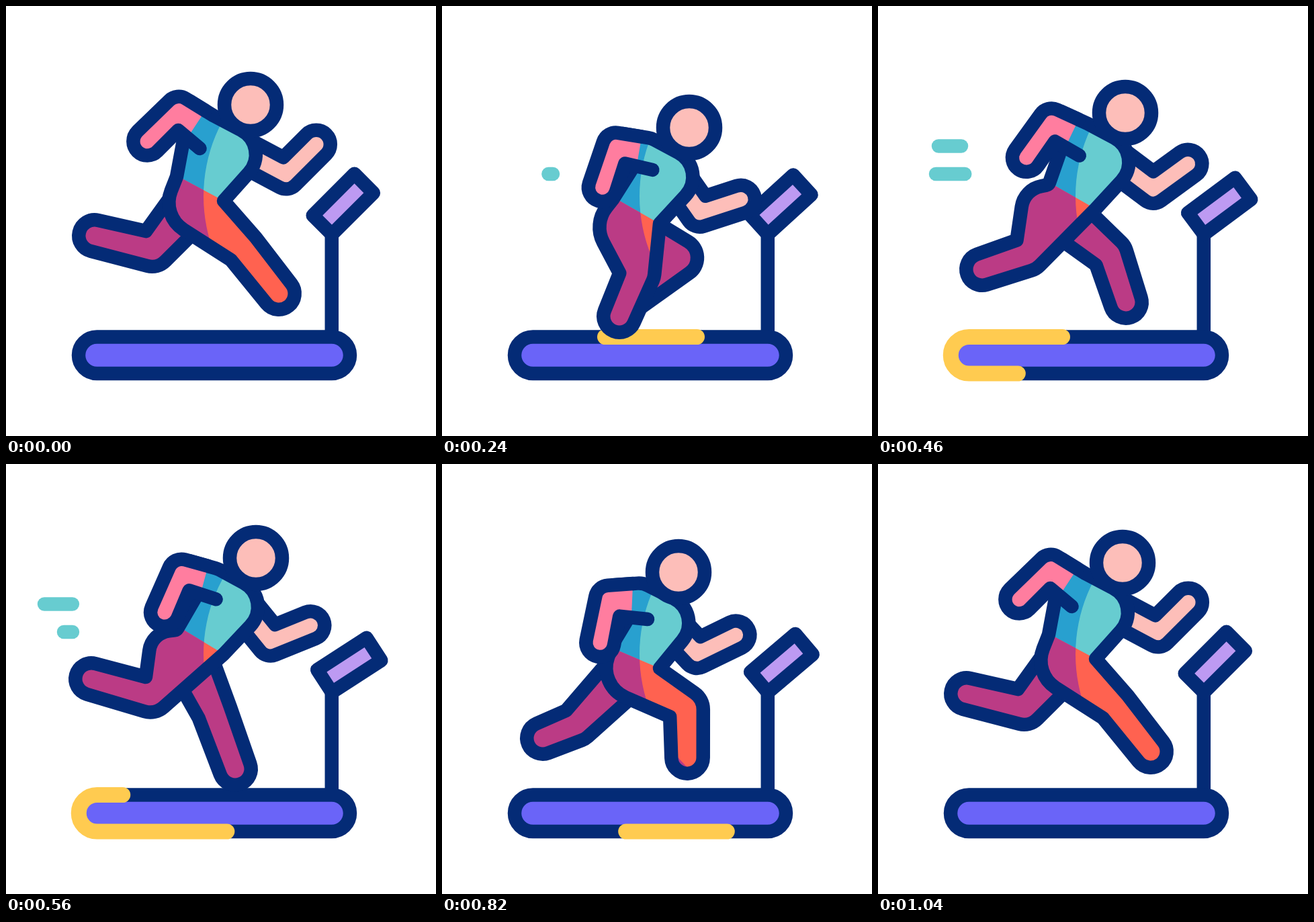
Write an HTML page with a canvas that moves like this. It is 640x640 px and loops after 1060 ms.

```html
<!DOCTYPE html>
<html lang="en">
<head>
<meta charset="utf-8">
<title>Treadmill runner</title>
<style>
  html, body { margin: 0; width: 100%; height: 100%; overflow: hidden; background: #fff; }
  canvas { display: block; width: 640px; height: 640px; }
</style>
</head>
<body>
<canvas id="stage" width="640" height="640"></canvas>
<script>
const ctx = document.getElementById('stage').getContext('2d');
const LOOP = 1060, STRIDE = 1040, FRAME = 20, LINE = 20.5;
const NAVY = '#042b76', TEAL = '#67ccd0', BLUE = '#28a0cf', ORANGE = '#ff6250',
  PLUM = '#bb3b85', SKIN = '#fdbeb9', PINK = '#ff7d9f', VIOLET = '#6a64f8',
  LILAC = '#bd9af2', YELLOW = '#ffcb50';

// Key poses: time | head | arm angles near, far | near knee, foot | far knee, foot
const POSES = [
  [0,   364, 147,   40, 45,   353, 361, 406, 428,   217, 363, 132, 342],
  [240, 368, 181,   13, 18,   290, 401, 264, 462,   356, 376, 282, 430],
  [460, 368, 159,   30, 36,   221, 370, 155, 392,   346, 371, 369, 441],
  [560, 372, 140,   18, 22,   215, 345, 127, 320,   310, 369, 341, 454],
  [720, 363, 153,   -3,  9,   308, 373, 226, 394,   270, 398, 238, 445],
  [820, 352, 161,    6, 26,   364, 363, 365, 437,   199, 388, 150, 408]
];

// Smooth periodic interpolation through the key poses.
function poseAt(t) {
  const n = POSES.length;
  const row = i => POSES[(i + n) % n];
  const time = i => row(i)[0] + Math.floor(i / n) * STRIDE;
  let i = n - 1;
  while (time(i) > t) i--;
  const h = time(i + 1) - time(i), u = (t - time(i)) / h;
  const slope = (j, k) => {
    const a = time(j) - time(j - 1), b = time(j + 1) - time(j);
    return ((row(j)[k] - row(j - 1)[k]) / a * b + (row(j + 1)[k] - row(j)[k]) / b * a) / (a + b);
  };
  const value = k => {
    const v = row(i)[k], w = row(i + 1)[k], m = slope(i, k) * h, q = slope(i + 1, k) * h;
    return v + u * (m + u * (3 * (w - v) - 2 * m - q + u * (2 * (v - w) + m + q)));
  };
  const point = k => ({ x: value(k), y: value(k + 1) });
  return {
    head: point(1), nearAngle: value(3), farAngle: value(4),
    knee: point(5), foot: point(7), farKnee: point(9), farFoot: point(11)
  };
}

// Piecewise linear motion through [time, value] pairs.
function ramp(t, ...keys) {
  if (t <= keys[0][0]) return keys[0][1];
  for (let i = 1; i < keys.length; i++) {
    const [a, v] = keys[i - 1], [b, w] = keys[i];
    if (t <= b) return v + (w - v) * (t - a) / (b - a);
  }
  return keys[keys.length - 1][1];
}

const shift = (p, x, y) => ({ x: p.x + x, y: p.y + y });
const polar = (p, deg, r) =>
  shift(p, r * Math.cos(deg * Math.PI / 180), r * Math.sin(deg * Math.PI / 180));
const mix = (a, b, f) => ({ x: a.x + (b.x - a.x) * f, y: a.y + (b.y - a.y) * f });
const dist = (a, b) => Math.hypot(a.x - b.x, a.y - b.y);
const unit = (a, b) => ({ x: (b.x - a.x) / dist(a, b), y: (b.y - a.y) / dist(a, b) });
const corner = (p, r) => ({ ...p, r });
const cap = (p, r) => ({ ...p, cap: r });

// Mitred outline points on both sides of joint b for a limb of half width w.
function bend(a, b, c, w) {
  const d = unit(a, b), e = unit(b, c);
  const x = d.x + e.x, y = d.y + e.y, k = 2 * w / (x * x + y * y);
  return [shift(b, y * k, -x * k), shift(b, -y * k, x * k)];
}

// Replaces a cap by its two tangent points, joined by an arc.
function withCaps(list) {
  return list.flatMap((p, i) => {
    if (!p.cap) return [p];
    const prev = list[i - 1], next = list[i + 1];
    const cross = (prev.x - p.x) * (next.y - p.y) - (prev.y - p.y) * (next.x - p.x);
    const side = cross > 0 ? 1 : -1;
    const touch = (q, s) => {
      const a = Math.atan2(q.y - p.y, q.x - p.x) + s * Math.acos(Math.min(1, p.cap / dist(p, q)));
      return { x: p.x + p.cap * Math.cos(a), y: p.y + p.cap * Math.sin(a), a };
    };
    const from = touch(prev, -side), to = touch(next, side);
    return [from, { ...to, arc: [p.x, p.y, p.cap, from.a, to.a, side > 0] }];
  });
}

function trace(list) {
  const path = new Path2D(), pts = withCaps(list);
  path.moveTo(pts[0].x, pts[0].y);
  for (let i = 1; i < pts.length; i++) {
    const p = pts[i], a = pts[i - 1], b = pts[i + 1];
    if (p.arc) path.arc(...p.arc);
    else if (p.r && b) {
      const turn = Math.atan2(a.y - p.y, a.x - p.x) - Math.atan2(b.y - p.y, b.x - p.x);
      const half = Math.acos(Math.max(-1, Math.min(1, Math.cos(turn)))) / 2;
      const room = .7 * Math.min(dist(a, p), dist(b, p)) * Math.tan(half);
      path.arcTo(p.x, p.y, b.x, b.y, Math.min(p.r, room));
    } else path.lineTo(p.x, p.y);
  }
  return path;
}

function fill(path, color, rule) {
  ctx.fillStyle = color;
  ctx.fill(path, rule || 'nonzero');
}
function stroke(path, color = NAVY, width = LINE) {
  ctx.strokeStyle = color;
  ctx.lineWidth = width;
  ctx.stroke(path);
}
function outlined(path, color) {
  fill(path, color);
  stroke(path);
}

function drawMachine(t) {
  stroke(new Path2D('M484.8 340V492'));
  const nod = t < 560 ? (t / 560) ** 1.8 : ((STRIDE - t) / 480) ** 1.2;
  ctx.save();
  ctx.translate(485, 340);
  ctx.rotate((12 * nod - 45) * Math.PI / 180);
  const screen = new Path2D();
  screen.rect(0, -40, 87.5, 40);
  outlined(screen, LILAC);
  ctx.restore();

  const belt = new Path2D();
  belt.roundRect(108, 492.5, 404, 54.5, 27.25);
  outlined(belt, VIOLET);

  const head = ramp(t, [20, 0], [240, 242], [590, 664], [920, 749]);
  const tail = ramp(t, [20, 0], [460, 210], [995, 749]);
  if (head - tail < 1) return;
  const loop = new Path2D();
  loop.moveTo(484.5, 492.5);
  loop.lineTo(135.5, 492.5);
  loop.arc(135.5, 519.75, 27.25, -Math.PI / 2, Math.PI / 2, true);
  loop.lineTo(484.5, 547);
  ctx.setLineDash([head - tail, 2000]);
  ctx.lineDashOffset = -tail;
  stroke(loop, YELLOW, 23);
  ctx.setLineDash([]);
}

// A streak whose ends both fly left at the same speed, the tail after the head.
function drawWind(t, y, from, to, start, delay) {
  const end = x => Math.max(to, Math.min(from, x));
  const head = end(from - .33 * (t - start));
  const tail = end(from - .303 * (t - start - delay));
  if (tail - head > .5) stroke(new Path2D(`M${head} ${y}H${tail}`), TEAL);
}

function drawFarArm({ head, farAngle }) {
  const elbow = polar(shift(head, -12.5, 39), 90 - farAngle, 92);
  const hand = polar(elbow, -farAngle, 64);
  const back = -farAngle - 107;
  const [fold, outer] = bend(polar(elbow, back, 60), elbow, hand, 21);
  outlined(trace([
    polar(fold, back, 48), fold, cap(hand, 21), corner(outer, 20), polar(outer, back, 60)
  ]), SKIN);
}

function drawFarLeg({ farKnee, farFoot }, waist) {
  const hip = shift(waist, -50, 8), d = unit(hip, farKnee), w = 32;
  const [front, back] = bend(hip, farKnee, farFoot, 25);
  outlined(trace([
    shift(hip, -d.y * w, d.x * w), back, cap(farFoot, 23.7),
    corner(front, 28), shift(hip, d.y * w, -d.x * w)
  ]), PLUM);
}

function drawBody({ head, nearAngle, knee, foot }, waist, lean) {
  const shoulder = { x: 312 - .4 * nearAngle + .8 * lean, y: head.y + 41 - .5 * lean };
  const elbow = polar(shoulder, nearAngle, -50);
  const wrist = polar(elbow, nearAngle + 95.5, 63);
  const [inner, outer] = bend(shoulder, elbow, wrist, 20.5);
  const fold = polar(inner, nearAngle, 42);

  const hip = shift(waist, -45, 0), swing = unit(hip, knee).x;
  const [kneeFront, kneeBack] = bend(hip, knee, foot, 25);
  const neck = shift(waist, .8 * lean - 13, -127);
  const body = trace([
    shift(mix(inner, fold, .25), 0, 6),
    corner(shift(waist, -70, -36), 6),
    corner(shift(waist, 10 * swing - 100, 37 * swing - 5), 48),
    kneeBack, cap(foot, 23.7), corner(kneeFront, 30), waist,
    corner(shift(waist, 74 + .5 * lean, -81), 41),
    corner(neck, 30), mix(outer, neck, .35)
  ]);

  // Everything left of a large circle lies in shade; the waist line splits shirt and trousers.
  const shade = new Path2D();
  shade.rect(0, 0, 640, 640);
  shade.arc(529, 283, 235, 0, 2 * Math.PI);
  const slope = .56 + .009 * lean;
  const level = x => waist.y + slope * (x - waist.x);
  const below = new Path2D(`M0 ${level(0)}L640 ${level(640)}V800H0Z`);
  ctx.save();
  ctx.clip(body);
  fill(body, TEAL);
  fill(shade, BLUE, 'evenodd');
  ctx.clip(below);
  fill(body, ORANGE);
  fill(shade, PLUM, 'evenodd');
  ctx.restore();
  stroke(body);

  const arm = [inner, cap(wrist, 21), corner(outer, 20), mix(outer, neck, .78)];
  fill(trace([mix(inner, fold, .42), ...arm]), PINK);
  stroke(trace([fold, ...arm]));
}

function draw(t) {
  const pose = poseAt(t % STRIDE), { head } = pose;
  const waist = { x: 324, y: head.y + 143 }, lean = head.x - 367;
  ctx.fillStyle = '#fff';
  ctx.fillRect(0, 0, 640, 640);
  ctx.lineJoin = ctx.lineCap = 'round';

  drawWind(t, 208.5, 124, 44, 357, 120);
  drawWind(t, 250, 165, 86, 220, 122);
  drawMachine(t);
  drawFarArm(pose);
  drawFarLeg(pose, waist);
  drawBody(pose, waist, lean);

  const face = new Path2D();
  face.arc(head.x, head.y, 39, 0, 2 * Math.PI);
  outlined(face, SKIN);
}

const start = performance.now();
function tick() {
  const t = (performance.now() - start) % LOOP;
  draw(Math.min(STRIDE, Math.floor(t / FRAME) * FRAME));
  requestAnimationFrame(tick);
}
tick();
</script>
</body>
</html>
```
